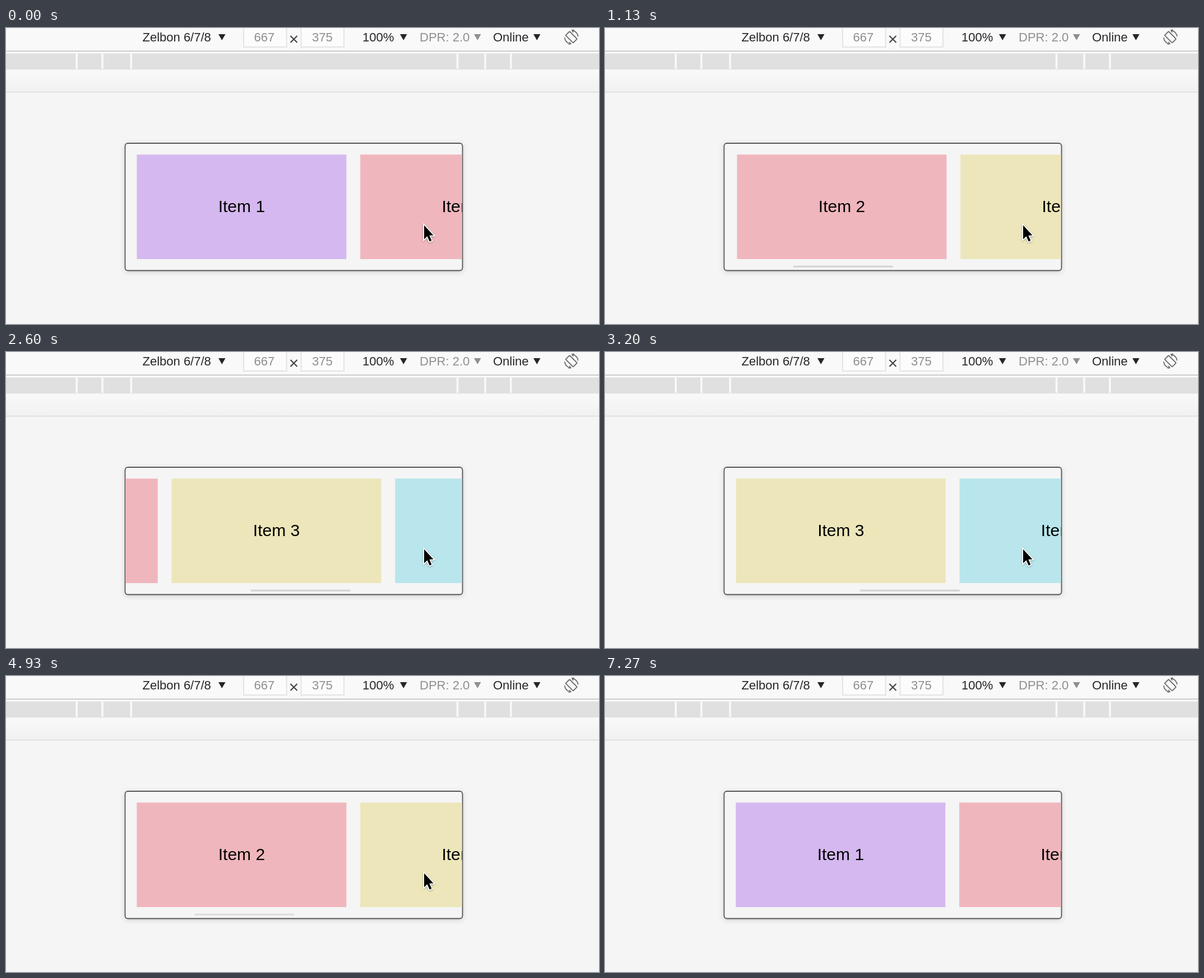
An HTML page for the animation above (7340 ms loop, 1058 by 529 pixels).

```html
<!DOCTYPE html>
<html lang="en">
<head>
<meta charset="utf-8">
<title>Snap carousel</title>
<style>
  html, body { margin: 0; width: 100%; height: 100%; overflow: hidden; background: #f5f5f5; }
  svg { display: block; width: 1058px; height: 529px; }
  text { font-family: "Liberation Sans", Arial, sans-serif; }
  .tool { font-size: 22px; fill: #262626; }
  .dim { fill: #8f8f8f; }
  .field { fill: #fcfcfc; stroke: #e4e4e4; stroke-width: 2; }
  .label { font-size: 30px; text-anchor: middle; fill: #000; }
  #frame { filter: drop-shadow(0 2px 5px rgba(0, 0, 0, .14)); }
  #cursor { filter: drop-shadow(0 1.5px 1.5px rgba(0, 0, 0, .3)); }
</style>
</head>
<body>
<svg viewBox="0 0 1058 529">
  <defs>
    <linearGradient id="strip" x2="0" y2="1">
      <stop offset="0" stop-color="#f9f9f9"/>
      <stop offset="1" stop-color="#f1f1f1"/>
    </linearGradient>
    <clipPath id="view"><rect x="213.5" y="207" width="600" height="226" rx="4"/></clipPath>
    <path id="down" d="M.5 0H13L6.75 11Z"/>
  </defs>

  <rect width="1058" height="75" fill="#f9f9f9"/>
  <rect y="40.5" width="1058" height="1.5" fill="#bdbdbd"/>
  <rect y="45.5" width="1058" height="29" fill="#e0e0e0"/>
  <path d="M126.2 45V73M172 45V73M223.2 45V73M805.5 45V73M855 45V73M900.8 45V73" stroke="#f9f9f9" stroke-width="3.6"/>
  <rect y="74.5" width="1058" height="40" fill="url(#strip)"/>
  <rect y="114" width="1058" height="1.2" fill="#d6d6d6"/>

  <rect class="field" x="424" y="-10" width="76.5" height="44"/>
  <rect class="field" x="526.5" y="-10" width="76.5" height="44"/>
  <g class="tool">
    <text x="243.5" y="24">Zelbon 6/7/8</text>
    <text x="636" y="24">100%</text>
    <text x="869" y="24">Online</text>
    <use href="#down" x="378.5" y="11"/>
    <use href="#down" x="702.5" y="11"/>
    <use href="#down" x="940.5" y="11"/>
  </g>
  <g class="tool dim">
    <text x="442.5" y="24">667</text>
    <text x="546" y="24">375</text>
    <text x="738" y="24">DPR: 2.0</text>
    <use href="#down" x="834.5" y="11"/>
  </g>
  <path d="M507.5 14L519.5 26M519.5 14L507.5 26" stroke="#444" stroke-width="2.2"/>
  <g transform="translate(1008.7 16.3)" fill="none" stroke="#6a6a6a" stroke-width="1.8">
    <rect x="-5" y="-9.5" width="10" height="19" rx="1" transform="rotate(-45)"/>
    <path d="M1 -12A12 12 0 0 1 12 -1M-1 12A12 12 0 0 1 -12 1"/>
    <path d="M5 -13L1 -12L3.5 -8.5M-5 13L-1 12L-3.5 8.5" stroke-width="1.5"/>
  </g>

  <rect id="frame" x="212.5" y="206" width="602" height="227.5" rx="5" fill="#f5f5f5" stroke="#58585a" stroke-width="1.8"/>
  <g clip-path="url(#view)">
    <g id="track"></g>
    <rect id="bar" x="217.7" y="424.5" width="178" height="3.6" rx="1.2" fill="#d6d6d6"/>
  </g>
  <path id="cursor" d="M746 352.6V377.6L751.6 372.2L755.7 381.6L759.4 380L755.4 370.8L762.6 370.4Z" stroke="#fff" stroke-width="3.4" paint-order="stroke"/>
</svg>
<script>
  const LOOP = 7340, STEP = 200 / 3, PITCH = 398.7;
  const RAMP = 200; // ms of finger acceleration before the glide
  const FADE = 170; // ms for the scrollbar to show or hide

  const [track, bar, cursor] = ["track", "bar", "cursor"].map(id => document.getElementById(id));
  const clamp = v => Math.min(1, Math.max(0, v));
  const ramp = (t, from, length) => clamp((t - from) / length);
  const smooth = p => p * p * (3 - 2 * p);

  ["#d5b8ef", "#f0b6bd", "#ede6ba", "#b8e6ec"].forEach((color, i) => {
    const x = 233.4 + i * PITCH;
    track.innerHTML +=
      `<rect x="${x}" y="226.2" width="373.9" height="186.8" fill="${color}"/>` +
      `<text class="label" x="${x + 187}" y="329.2">Item ${i + 1}</text>`;
  });

  // touch shows the bar, start moves the items, hide begins the bar's fade; tau is the glide's decay
  const swipes = [
    { touch: 30, start: 372, hide: 1550, dir: 1, tau: 121 },
    { touch: 1960, start: 2248, hide: 3550, dir: 1, tau: 121 },
    { touch: 3700, start: 3786, hide: 4880, dir: -1, tau: 121 },
    { touch: 5180, start: 5509, hide: 6220, dir: -1, tau: 90 }
  ];

  // quadratic ramp that meets an exponential glide at equal speed
  function travel(u, tau) {
    const share = 1 / (1 + 2 * tau / RAMP);
    if (u < RAMP) return share * clamp(u / RAMP) ** 2;
    const p = 1 - (1 - share) * Math.exp((RAMP - u) / tau);
    return p > 0.999 ? 1 : p;
  }

  function draw(now) {
    const t = Math.floor((now % LOOP + 3.4) / STEP) * STEP;

    let scroll = 0, alpha = 0;
    for (const s of swipes) {
      scroll += s.dir * PITCH * travel(t - s.start, s.tau);
      alpha = Math.max(alpha, ramp(t, s.touch, FADE) - ramp(t, s.hide, FADE));
    }
    track.setAttribute("transform", `translate(${-scroll} 0)`);
    bar.setAttribute("transform", `translate(${scroll * 0.2975} 0)`);
    bar.setAttribute("opacity", alpha);

    // the pointer darts right, drifts down, then disappears
    const dart = smooth(ramp(t, 6400, 200)), drift = smooth(ramp(t, 6800, 400));
    cursor.setAttribute("transform", `translate(${216 * dart + 2 * drift} ${85 * dart + 26 * drift})`);
    cursor.setAttribute("visibility", t < 7260 ? "visible" : "hidden");
  }

  let begin;
  function tick(now) {
    begin ??= now;
    draw(now - begin);
    requestAnimationFrame(tick);
  }
  draw(0);
  requestAnimationFrame(tick);
</script>
</body>
</html>
```
